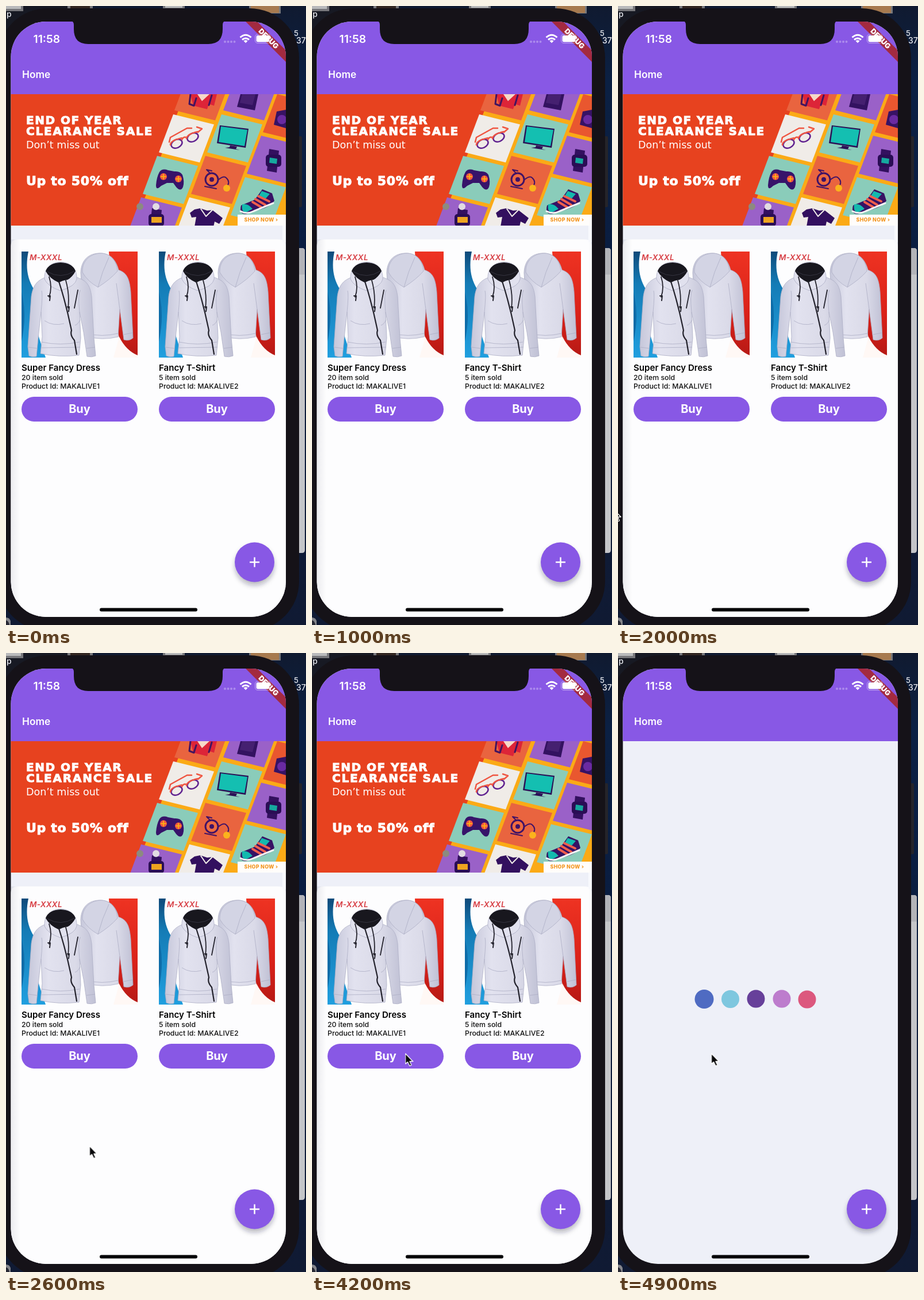
An HTML page that plays this animation: 522 by 1074 pixels, repeating every 5 s.

```html
<!DOCTYPE html>
<html lang="en">
<head>
<meta charset="utf-8">
<title>Shop app</title>
<style>
html, body { margin: 0; width: 100%; height: 100%; overflow: hidden; background: #0a1730; }
svg { display: block; width: 100%; height: 100%; }
text { font-family: Inter, Roboto, sans-serif; }
.wide { font-family: "DejaVu Sans", sans-serif; fill: #fff; }
.heavy { font-weight: 700; stroke: #fff; stroke-width: 1px; }
.name { font-size: 15.1px; font-weight: 600; }
.info { font-size: 12.3px; font-weight: 500; fill: #111; }
.buy { font-size: 20px; font-weight: 700; fill: #fff; text-anchor: middle; }
.line { fill: none; stroke-linecap: round; stroke-linejoin: round; }

/* the shop gives way to the loader for the last 100 ms */
#home { animation: home 5s step-end infinite; }
#loader { animation: loader 5s step-end infinite; }
@keyframes home { 0% { visibility: visible; } 98%, 100% { visibility: hidden; } }
@keyframes loader { 0% { visibility: hidden; } 98%, 100% { visibility: visible; } }

/* the pointer moves ten times a second */
#pointer { animation: point 5s infinite; }
@keyframes point {
  0% { transform: translate(-40px, 880px); animation-timing-function: step-end; }
  38% { transform: translate(-12px, 876px); animation-timing-function: step-end; }
  40% { transform: translate(-8px, 873px); animation-timing-function: steps(4, end); }
  48% { transform: translate(80px, 866px); animation-timing-function: steps(3, end); }
  54% { transform: translate(178px, 850px); animation-timing-function: step-end; }
  56% { transform: translate(178px, 850px); animation-timing-function: steps(5, end); }
  66% { transform: translate(164px, 668px); animation-timing-function: step-end; }
  68% { transform: translate(164px, 668px); animation-timing-function: steps(3, end); }
  74%, 100% { transform: translate(162.5px, 695px); animation-timing-function: step-end; }
}
</style>
</head>
<body>
<svg viewBox="0 0 522 1074" preserveAspectRatio="none">
<defs>
  <linearGradient id="sky" x2="0" y2="1">
    <stop stop-color="#101a30"/><stop offset=".12" stop-color="#0b2043"/>
    <stop offset=".4" stop-color="#0a1d40"/><stop offset="1" stop-color="#101a33"/>
  </linearGradient>
  <linearGradient id="edge">
    <stop stop-color="#778" stop-opacity=".13"/><stop offset="1" stop-color="#778" stop-opacity="0"/>
  </linearGradient>
  <linearGradient id="cloth">
    <stop stop-color="#c6c7da"/><stop offset=".3" stop-color="#e2e2ef"/>
    <stop offset=".7" stop-color="#dadae8"/><stop offset="1" stop-color="#c0c1d5"/>
  </linearGradient>
  <linearGradient id="blue" x2="0" y2="1">
    <stop stop-color="#0f4a7a"/><stop offset=".3" stop-color="#147bb5"/><stop offset="1" stop-color="#209fdf"/>
  </linearGradient>
  <linearGradient id="red" x2="0" y2="1">
    <stop stop-color="#ee3322"/><stop offset=".6" stop-color="#d92119"/><stop offset="1" stop-color="#b51915"/>
  </linearGradient>
  <filter id="soft" x="-30%" y="-30%" width="160%" height="160%"><feGaussianBlur stdDeviation="4"/></filter>
  <clipPath id="screen"><rect x="8.500" y="27" width="478.500" height="1033" rx="61"/></clipPath>
  <clipPath id="banner"><rect x="8" y="153" width="479" height="228"/></clipPath>
  <clipPath id="photo"><rect width="202" height="184"/></clipPath>
  <path id="tile" d="M-23-42l71 17.500l-25 66l-71-17.500z"/>
  <g id="watch">
    <path d="M-8-20L9-17L5 21L-12 18z" fill="#33105f"/>
    <rect x="-14" y="-10" width="27" height="21" rx="5" fill="#2a0d55"/>
  </g>

  <g id="hoodie" clip-path="url(#photo)">
    <rect width="202" height="184" fill="#fdfdfe"/>
    <path d="M0 0H12C7 24 9 46 22 66V120Q30 150 42 184H0z" fill="url(#blue)"/>
    <path d="M0 70Q10 110 0 156z" fill="#0d6ca8"/>
    <path d="M152 0H202V184Q182 178 170 150L158 90z" fill="url(#red)"/>
    <path d="M170 148Q182 172 202 180V184H160z" fill="#fff8f5"/>
    <g stroke="#adaec4" stroke-width=".8">
      <path d="M103 37C104 10 122 2 139 3C158 4 166 20 169 32C184 37 188 48 190 70L194 150Q187 156 178 153L171 100L168 148Q140 155 113 147L105 70z" fill="url(#cloth)"/>
      <path d="M106 36C105 14 122 3 139 3C158 4 166 20 167 34Q155 48 133 62Q115 52 106 36z" fill="#d3d4e4"/>
      <path d="M133 62Q140 35 152 10M171 100L165 55M113 142Q140 149 168 142M178 144L193 141" fill="none"/>
      <path d="M41 45C26 51 20 59 17 78L11 165L13 181Q19 184 26 182L30 140L34 105L36 148L33 177Q65 184 100 180L103 150L101 105L108 140L114 182Q122 184 129 181L126 150L122 78C119 57 113 51 97 45Q70 40 41 45z" fill="url(#cloth)"/>
      <path d="M40 48C39 28 52 19 68 18C85 19 97 29 96 48Q94 60 68 68Q46 61 40 48z" fill="#e1e1ee"/>
      <path d="M34 105Q37 75 35 68M101 105Q98 75 102 67M35 157Q67 164 101 157M35 167L102 166M12 166L27 168M113 168L128 166M40 120Q55 130 74 125M93 128Q99 126 102 118" fill="none"/>
    </g>
    <path d="M42 34Q47 20 68 19Q89 20 94 34Q88 45 80 49Q71 50 65 54Q49 47 42 34z" fill="#18171e"/>
    <path d="M45 35Q68 49 92 34" class="line" stroke="#353440"/>
    <path d="M65 52C78 92 83 118 87 137Q84 145 92 154L96 178" class="line" stroke="#22212b" stroke-width="2.2"/>
    <path d="M48 44Q54 62 48 79M77 50Q84 75 81 98M98 67L92 98" class="line" stroke="#25242e" stroke-width="1.8"/>
    <path d="M46 77l4 0l-1 8M80 96l3 0l-1 8" class="line" stroke="#25242e" stroke-width="2"/>
    <text x="14" y="14.500" font-size="13.500" font-weight="600" font-style="italic" letter-spacing=".3" fill="#d73c42">M-XXXL</text>
  </g>
  <g id="card">
    <use href="#hoodie" y="426"/>
    <rect y="678" width="202" height="43" rx="21.500" fill="#8858e5"/>
    <text class="buy" x="101" y="706">Buy</text>
  </g>
</defs>

<!-- desktop -->
<rect width="522" height="1074" fill="url(#sky)"/>
<rect width="110" height="90" fill="#171923"/>
<path d="M0 0H30V9H0M107 0h44v6h-44M273 0h38v6h-38M423 0h55v13h-55" fill="#77777b"/>
<path d="M112 0h34v4h-34" fill="#322621"/>
<path d="M426 0h49v12h-49" fill="#a77a4f"/>
<path d="M0 0H26V5H0M277 0h30v3h-30" fill="#b9babb"/>
<g fill="#e8eaf0" font-size="14" font-weight="500">
  <text x="1" y="19">p</text>
  <text x="501" y="52" font-size="13">5</text>
  <text x="505" y="65">37</text>
</g>
<path d="M510 420h5q5 0 5 5v519q0 5-5 5h-5z" fill="#c4c5c8"/>
<path d="M510 420h5q5 0 5 5v41h-10z" fill="#b2b3b8"/>

<!-- phone -->
<rect x="507" y="226" width="8" height="123" rx="2" fill="#25242a"/>
<rect x="-14" y="4" width="524" height="1080" rx="86" fill="#151218"/>
<path d="M0 1061q6 0 8 6v7H0z" fill="#85868c"/>
<path d="M0 1066q4 0 6 8H0z" fill="#272833"/>

<g clip-path="url(#screen)">
  <rect x="8" y="27" width="479" height="1033" fill="#eef0f8"/>

  <g id="home">
    <path d="M8 418q0-13 13-13H474q13 0 13 13V1060H8z" fill="#fdfdfe"/>
    <rect x="8" y="405" width="17" height="655" fill="url(#edge)"/>
    <rect x="481" y="380" width="6" height="30" fill="#f9fafe"/>

    <g clip-path="url(#banner)">
      <rect x="8" y="153" width="479" height="228" fill="#e7421f"/>
      <path d="M311 153H487V381H223z" fill="#fbaa16"/>
      <use href="#tile" x="341" y="157" fill="#e9643f"/>
      <use href="#tile" x="314" y="230" fill="#f0ece8"/>
      <use href="#tile" x="286" y="302" fill="#8accba"/>
      <use href="#tile" x="258" y="374" fill="#9a61c8"/>
      <use href="#tile" x="426" y="157" fill="#9a61c8"/>
      <use href="#tile" x="398" y="230" fill="#8accba"/>
      <use href="#tile" x="370" y="302" fill="#e9643f"/>
      <use href="#tile" x="342" y="374" fill="#f0ece8"/>
      <use href="#tile" x="495" y="195" fill="#e9572f"/>
      <use href="#tile" x="467" y="267" fill="#9a61c8"/>
      <use href="#tile" x="439" y="339" fill="#8accba"/>

      <!-- jacket and phone -->
      <path d="M321 153H367L362 173L353 170L350 179L326 173z" fill="#dd2438"/>
      <path d="M333 153l8 12 13-12" fill="#f5d8c7"/>
      <path d="M321 153l-2 17 8 3 4-13M358 155l-5 17" class="line" stroke="#42145f" stroke-width="3"/>
      <path d="M408 153H439L433 181L402 175z" fill="#331260"/>
      <path d="M411 153H434L429 172L407 168z" fill="#452070"/>

      <!-- glasses -->
      <g class="line" stroke-width="2.500">
        <ellipse cx="297" cy="239" rx="10" ry="7" transform="rotate(-25 297 239)" stroke="#612390"/>
        <ellipse cx="325" cy="228" rx="10" ry="7" transform="rotate(-25 325 228)" stroke="#612390"/>
        <path d="M286 241q0-8 20-12M314 230q1-8 20-12M306 232q3-6 8-4M284 236l2-8 29-16 8 0M334 219l7-6-9-3" stroke="#ef5541"/>
      </g>

      <!-- television -->
      <path d="M372 207L422 213L417 246L367 238z" fill="#2b1056"/>
      <path d="M374 209L420 215L415 243L370 236z" fill="#14bfb1"/>
      <path d="M390 242l12 2-2 4 7 2-26-4 8-1z" fill="#2b1056"/>

      <!-- gamepad -->
      <path d="M267 288q5-7 15-3l11 2q10-1 14 6q4 12 1 21q-4 9-12 0l-5-7h-11l-10 5q-9 9-9-1q1-14 6-23z" fill="#37136a"/>
      <circle cx="274" cy="296" r="6" fill="#ef5541"/>
      <circle cx="300" cy="300" r="6" fill="#ef5541"/>
      <path d="M274 292v8M270 296h8M300 296v8M296 300h8" class="line" stroke="#fbaa16" stroke-width="2"/>

      <!-- measuring disc -->
      <circle cx="358" cy="301" r="11" fill="#ee6b3f" stroke="#401266" stroke-width="3"/>
      <circle cx="358" cy="301" r="4" fill="#401266"/>
      <path d="M354 289l-5-5 9 2M346 313l20 4M370 301q9-7 13-3q8 7 1 16" class="line" stroke="#401266" stroke-width="2"/>
      <circle cx="384" cy="316" r="6" fill="#fbb31d"/>

      <use href="#watch" x="466" y="268"/>
      <path d="M459 263l13 2-1 9-13-2z" fill="#16a89f"/>
      <use href="#watch" x="262" y="371"/>
      <path d="M253 366h18v10h-18z" fill="#eea41f"/>

      <!-- camera -->
      <path d="M471 183l16-3v32l-21-6z" fill="#371264"/>
      <circle cx="480" cy="197" r="8" fill="#6a2aa1"/>

      <!-- polo shirt -->
      <path d="M328 353l10-2 12 4 9-1 18 14-6 10-8-4-2 9H328l3-17-8 1-3-8z" fill="#33105f"/>
      <path d="M339 352l9 13 11-11" class="line" stroke="#f0ece8" stroke-width="2"/>

      <!-- sneaker -->
      <path d="M409 346l24-10 13-18 17 7 4 13q-7 10-24 15l-25 8q-13 1-9-15z" fill="#371264"/>
      <path d="M411 344q10-2 18 8l-11 6q-9 0-7-14M445 321l14 5-7 8-13-3z" fill="#13b9ae"/>
      <path d="M429 340l15 9M434 335l17 10M439 330l19 9" class="line" stroke="#f05f4d" stroke-width="4"/>
      <path d="M408 356q11 6 23 0l34-14" class="line" stroke="#f4f3f4" stroke-width="3"/>

      <text class="wide heavy" x="35" y="205" font-size="20" letter-spacing="1.500">END OF YEAR</text>
      <text class="wide heavy" x="35" y="224" font-size="20" letter-spacing="1.800">CLEARANCE SALE</text>
      <text class="wide" x="35" y="247" font-size="17.500">Don’t miss out</text>
      <text class="wide heavy" x="35" y="311" font-size="22" letter-spacing=".7">Up to 50% off</text>
      <circle cx="233" cy="348" r="6" fill="#8c8a80"/>
      <circle cx="261" cy="348" r="6" fill="#e2dce2"/>
      <rect x="403" y="362" width="84" height="19" fill="#fffdfb"/>
      <text x="414.500" y="374" font-size="8.800" font-weight="800" letter-spacing=".35" fill="#f3951f">SHOP NOW ›</text>
    </g>

    <use href="#card" x="27"/>
    <use href="#card" x="266"/>
    <text class="name" x="27" y="633">Super Fancy Dress</text>
    <text class="info" x="27" y="649">20 item sold</text>
    <text class="info" x="27" y="664">Product Id: MAKALIVE1</text>
    <text class="name" x="266" y="633">Fancy T-Shirt</text>
    <text class="info" x="266" y="649">5 item sold</text>
    <text class="info" x="266" y="664">Product Id: MAKALIVE2</text>
  </g>

  <g id="loader">
    <circle cx="150" cy="600.500" r="16.500" fill="#4f6bc2"/>
    <circle cx="195.500" cy="600.500" r="15.500" fill="#7ec7df"/>
    <circle cx="240" cy="600" r="15.500" fill="#67409a"/>
    <circle cx="285" cy="600" r="15.500" fill="#bd7ccd"/>
    <circle cx="329" cy="601" r="15.500" fill="#dc587e"/>
  </g>

  <!-- app bar and status bar -->
  <rect x="8" y="27" width="479" height="126" fill="#8858e5"/>
  <path d="M112 26q6 0 6 7v7q0 26 25 26H352q25 0 25-26v-7q0-7 6-7z" fill="#151218"/>
  <text x="47.500" y="64" font-size="19.300" font-weight="600" fill="#fff">11:58</text>
  <text x="28" y="125" font-size="17.300" font-weight="600" fill="#fff">Home</text>
  <path d="M417 27L487 97V77L437 27z" fill="#a32a40"/>
  <g fill="#fff" fill-opacity=".3">
    <circle cx="381" cy="62" r="2"/><circle cx="386.500" cy="62" r="2"/>
    <circle cx="392" cy="62" r="2"/><circle cx="397.500" cy="62" r="2"/>
  </g>
  <path d="M407.500 54.500q9.500-8.500 19 0M411 58.500q6-5 12 0" fill="none" stroke="#fff" stroke-width="3"/>
  <path d="M413.500 60.500q3.500-2.500 7 0l-3.500 3.800z" fill="#fff"/>
  <rect x="433.500" y="49" width="27" height="15.500" rx="4.500" fill="none" stroke="#fff" stroke-opacity=".45"/>
  <rect x="435.500" y="51" width="23" height="11.500" rx="3" fill="#fff"/>
  <path d="M462 54q3 2.500 0 5z" fill="#fff" fill-opacity=".5"/>
  <text transform="translate(457 56.500) rotate(45)" y="4.500" text-anchor="middle" font-size="12.500" font-weight="900" fill="#fff">DEBUG</text>

  <!-- add button -->
  <circle cx="432.500" cy="971" r="34" fill="#223" fill-opacity=".32" filter="url(#soft)"/>
  <circle cx="432.500" cy="965" r="34.500" fill="#8858e5"/>
  <path d="M424 965h17M432.500 956.500v17" stroke="#fff" stroke-width="2.500"/>
  <rect x="163" y="1044.500" width="170" height="6" rx="3" fill="#050507"/>
</g>

<g id="pointer">
  <path d="M0 0V18L4 14.500L7.500 21.500L10.500 20L7.500 13.500H13z" fill="#08080a" stroke="#fff" stroke-width="1.300" stroke-linejoin="round"/>
</g>
</svg>
</body>
</html>
```
